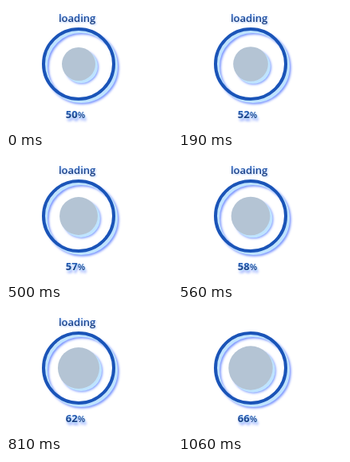
An HTML page that plays this animation: 208 by 156 pixels, repeating every 1120 ms.

```html
<!DOCTYPE html>
<html lang="en">
<head>
<meta charset="utf-8">
<title>Loading</title>
<style>
  html, body { margin: 0; width: 100%; height: 100%; overflow: hidden; background: #fff; }
  svg { display: block; width: 208px; height: 156px; }
  .ring { fill: none; stroke-width: 4; }
  .disc { r: var(--r, 21px); }
  .blue { fill: #7795ff; filter: url(#soft); }
  .cyan { fill: #bfe4ff; filter: url(#edge); }
  .ring.blue { fill: none; stroke: #6f8cff; }
  .ring.cyan { fill: none; stroke: #bfe4ff; }
  text { font: 600 13px "Open Sans", "Noto Sans", sans-serif; }
  .label { fill: url(#ink); filter: drop-shadow(1px 1px 1px #a9c6ff); }
  #percent { text-anchor: middle; font-weight: 700; }
  #percent .sign { font-size: 11px; font-weight: 600; }
  #percent { filter: drop-shadow(1px 1px .5px #bfe4ff) drop-shadow(1px 3px 1.5px #a9bcff); }
</style>
</head>
<body>
<svg viewBox="0 0 208 156">
  <defs>
    <filter id="soft" x="-20%" y="-20%" width="140%" height="140%"><feGaussianBlur stdDeviation="1.6"/></filter>
    <filter id="edge" x="-20%" y="-20%" width="140%" height="140%"><feGaussianBlur stdDeviation=".6"/></filter>
    <linearGradient id="ink" x2="0" y2="1">
      <stop offset=".2" stop-color="#2b66c4"/>
      <stop offset=".75" stop-color="#153a7c"/>
    </linearGradient>
  </defs>

  <circle class="ring blue" cx="95.5" cy="77.5" r="44"/>
  <circle class="ring cyan" cx="94" cy="76" r="44"/>
  <circle class="ring" cx="91" cy="73" r="44" stroke="#1a54b8"/>

  <g id="core">
    <circle class="disc blue" cx="95" cy="77"/>
    <circle class="disc cyan" cx="94" cy="76"/>
    <circle class="disc" cx="91" cy="73" fill="#b4c4d4"/>
  </g>

  <text class="label" id="caption" x="66" y="20">loading</text>
  <text class="label" id="percent" x="87" y="141"><tspan id="count">50</tspan><tspan class="sign">%</tspan></text>
</svg>
<script>
  const LOOP = 1120;
  // [start in ms, percent]
  const steps = [
    [0, 50], [60, 51], [190, 52], [320, 54], [380, 55], [440, 56], [500, 57],
    [560, 58], [690, 60], [750, 61], [810, 62], [940, 64], [1000, 65], [1060, 66]
  ];
  const $ = id => document.getElementById(id);
  const core = $("core"), caption = $("caption"), count = $("count");
  let shown;

  function draw() {
    const t = performance.now() % LOOP;
    const value = steps.findLast(([start]) => start <= t)[1];
    if (value !== shown) {
      shown = value;
      count.textContent = value;
      core.style.setProperty("--r", value * 0.42 + "px");
      // the caption blinks off once every ten percent
      caption.style.visibility = value % 10 === 6 ? "hidden" : "visible";
    }
    requestAnimationFrame(draw);
  }
  draw();
</script>
</body>
</html>
```
